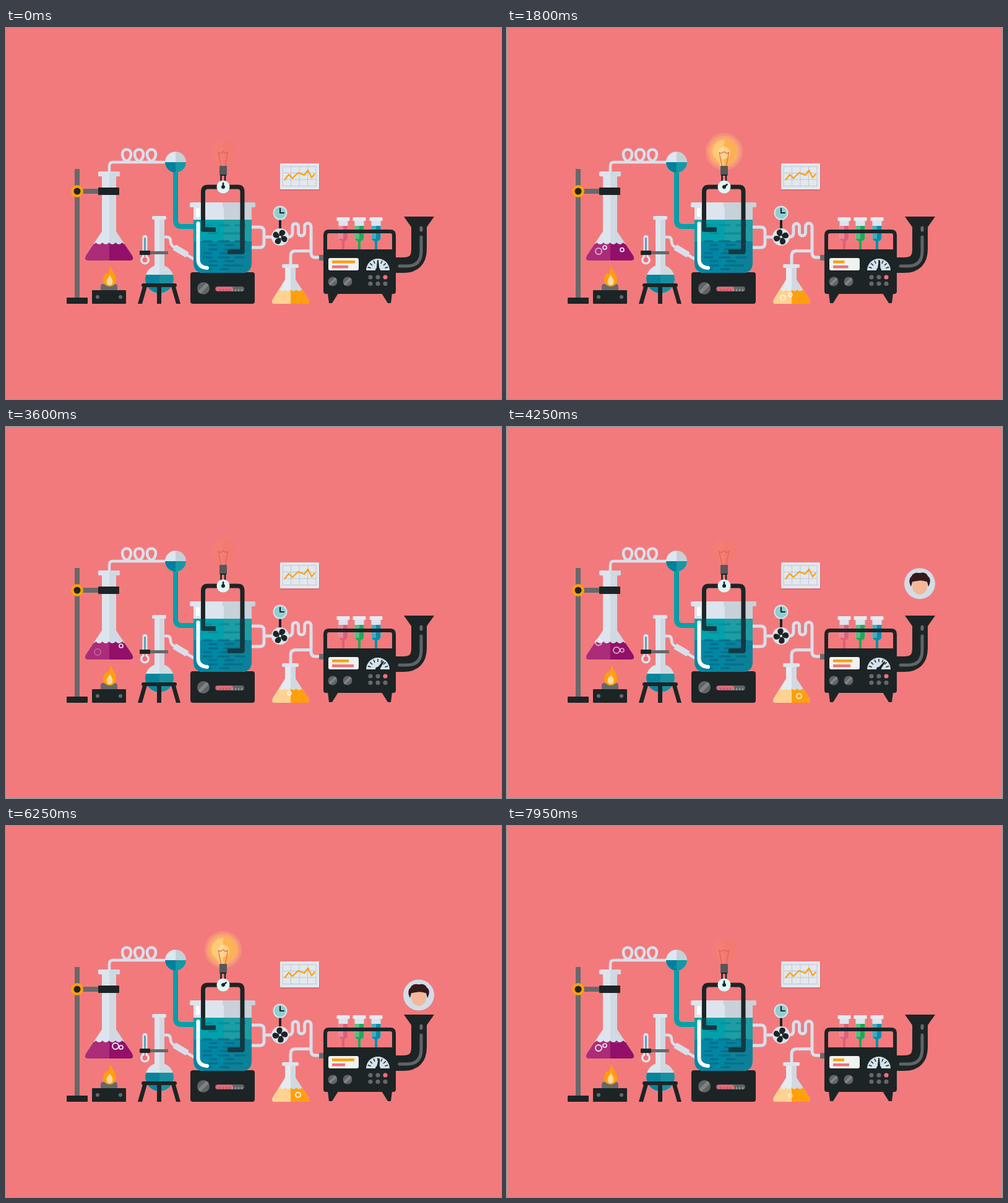
Animation of 800 by 600 pixels, one loop 8 s. Source, as an HTML page with a canvas:

```html
<!DOCTYPE html>
<html lang="en">
<head>
<meta charset="utf-8">
<title>Laboratory</title>
<style>
html, body { margin: 0; width: 100%; height: 100%; overflow: hidden; background: #f27a7c; }
canvas { display: block; width: 800px; height: 600px; }
</style>
</head>
<body>
<canvas id="stage" width="800" height="600"></canvas>
<script>
const c = document.getElementById('stage').getContext('2d');
const LOOP = 8000, STEP = 50, TAU = Math.PI * 2;
const BG = '#f27a7c', DARK = '#1d2426', GREY = '#67686a', GLASS = '#dce4ed', SHADE = '#d0d9e2',
  TUBE = '#d9dfea', ORANGE = '#ff9f0d', TEAL = '#00a1ab', DEEP = '#00809b', PINK = '#f0707a';

const clamp = v => Math.max(0, Math.min(1, v));
const ramp = (t, a, b) => clamp((t - a) / (b - a));

function key(t, list) {
  for (let i = 1; i < list.length; i++) {
    const [t0, v0] = list[i - 1], [t1, v1] = list[i];
    if (t <= t1) return v0 + (v1 - v0) * (t - t0) / (t1 - t0);
  }
  return list[list.length - 1][1];
}

function rect(x, y, x2, y2, color, r = 0) {
  c.fillStyle = color;
  c.beginPath();
  c.roundRect(x, y, x2 - x, y2 - y, r);
  c.fill();
}

function disc(x, y, r, color) {
  c.fillStyle = color;
  c.beginPath();
  c.arc(x, y, r, 0, TAU);
  c.fill();
}

function ring(x, y, r, width, color) {
  c.strokeStyle = color;
  c.lineWidth = width;
  c.beginPath();
  c.arc(x, y, r, 0, TAU);
  c.stroke();
}

function shape(d, color) {
  c.fillStyle = color;
  c.fill(new Path2D(d));
}

function line(d, width, color, cap = 'butt') {
  c.strokeStyle = color;
  c.lineWidth = width;
  c.lineCap = cap;
  c.lineJoin = 'round';
  c.stroke(new Path2D(d));
}

function inside(path, draw) {
  c.save();
  c.clip(typeof path === 'string' ? new Path2D(path) : path);
  draw();
  c.restore();
}

function halves(d, x, left, right) {
  inside(d, () => {
    rect(0, 0, x, 600, left);
    rect(x, 0, 800, 600, right);
  });
}

function ball(x, y, r) {
  const p = new Path2D();
  p.arc(x, y, r, 0, TAU);
  return p;
}

// Liquid with a scalloped surface, to be clipped by its vessel.
function waves(x0, x1, y, n, depth) {
  const w = (x1 - x0) / n;
  let d = `M${x0},${y}`;
  for (let i = 0; i < n; i++) d += `q${w / 2},${depth} ${w},0`;
  return d + `V460H${x0}Z`;
}

function stand() {
  rect(111, 228, 119, 437, GREY);
  rect(98, 436, 132, 446, DARK, 1);
  rect(123, 260, 151, 268, GREY);
  disc(115, 264, 10, ORANGE);
  disc(115, 264, 5.5, DARK);
}

function burner(t) {
  shape('M153,424V418Q153,414 157,414H176Q180,414 180,418V424Z', GREY);
  rect(139, 424, 194, 446, DARK, 1);
  disc(148, 435, 3, GREY);
  disc(185, 435, 3, GREY);
  const s = Math.sin(t / 110) * 1.2, h = Math.sin(t / 75) * 0.8;
  shape(`M${168 + s},${384 + h}C${169 + s},391 178,397 178,407C178,414 173,418 167.5,418C162,418 157,414 157,407C157,402 160,400 161,396C163,397 164,398 164,398C167,394 ${168 + s},389 ${168 + s},${384 + h}Z`, ORANGE);
  shape(`M${168 + s / 2},${399 + h}C169,404 172.5,405 172.5,410C172.5,414 170,416 167.5,416C165,416 162.500,414 162.500,410C162.500,405 ${167 + s / 2},403 ${168 + s / 2},${399 + h}Z`, '#ffd9a0');
}

function bigFlask() {
  line('M167,234V223Q167,217 173,217H260', 4.5, TUBE);
  for (const x of [195, 215, 235])
    line(`M${x - 8},217C${x + 4},217 ${x + 7},209 ${x + 7},204C${x + 7},194 ${x - 7},194 ${x - 7},204C${x - 7},209 ${x - 4},217 ${x + 8},217`, 4.5, TUBE);
  const body = 'M155,238H178V329L204,368Q208,376 200,376H133Q125,376 129,368L155,329Z';
  halves(body, 167, GLASS, SHADE);
  inside(body, () => halves(waves(124, 209, 347, 8, 6), 167, '#ab2c79', '#92106a'));
  rect(149, 232, 184, 240, GLASS, 2);
  rect(167, 232, 184, 240, SHADE, 2);
  rect(149, 258, 183, 270, DARK, 1);
}

function receiver() {
  line('M274,230V311Q274,321 284,321H304', 8, TEAL);
  line('M277,234V310', 2, '#0b95a0');
  const b = ball(274, 217, 17);
  halves(b, 274, '#dce7ef', '#c6cfd6');
  inside(b, () => {
    rect(250, 217, 274, 240, DEEP);
    rect(274, 217, 300, 240, '#1597a6');
  });
}

function roundFlask() {
  line('M255,338H260Q266,338 266,345Q266,352 273,355L304,374', 4.5, TUBE);
  line('M272,354.500L293,367', 10, TUBE, 'butt');
  rect(240, 308, 256, 392, GLASS);
  rect(248, 308, 256, 392, SHADE);
  const b = ball(248, 406, 23);
  halves(b, 248, GLASS, SHADE);
  inside(b, () => {
    rect(220, 399, 248, 432, '#07839c');
    rect(248, 399, 275, 432, '#188fa0');
  });
  rect(236, 304, 259, 310, GLASS, 2);
  rect(219, 413, 276, 419, DARK, 3);
  shape('M221,418H228L220,446H213Z', DARK);
  shape('M267,418H274L282,446H275Z', DARK);
  rect(244, 418, 251, 446, DARK);
  disc(224.5, 375, 7.5, GLASS);
  rect(220.5, 335, 228.5, 374, GLASS, 4);
  rect(223, 339, 226, 362, '#5f9fb8', 1);
  rect(223.5, 362, 225.5, 375, PINK);
  disc(224.5, 375, 4, PINK);
  rect(233, 361, 262, 366, GREY);
  rect(216, 360, 233, 367, DARK, 1);
}

function bulb(power, turn) {
  if (power > 0) {
    c.globalAlpha = power;
    disc(351, 200, 30, '#f58f7b');
    disc(351, 200, 26, '#f7a277');
    disc(351, 200, 22, '#fbb264');
    c.globalAlpha = 1;
  }
  const glass = 'M351,181C362,181 370,189 370,200C370,211 358,214 358,223H344C344,214 332,211 332,200C332,189 340,181 351,181Z';
  halves(glass, 351, '#f47d75', '#f37a70');
  if (power > 0) {
    c.globalAlpha = power;
    halves(glass, 351, '#ffcb76', '#fdb451');
    disc(351, 202, 10, 'rgba(255,232,175,.6)');
    c.globalAlpha = 1;
  }
  line('M347.500,223L343,201L346.500,203L351,200L355,203L358.500,201L354.500,223', 1.2, power > .3 ? '#e95d4d' : '#dd625d');
  rect(345, 223, 357, 238, '#57585a', 1);
  rect(346, 237, 356, 239, DARK);
  line('M347.500,238V250M354,238V250', 2.5, DARK);
  disc(351, 257, 10.5, '#dff7f5');
  c.save();
  c.translate(351, 257);
  c.rotate(turn);
  line('M0,0V-6', 2.5, DARK, 'round');
  disc(0, 0, 3, DARK);
  c.restore();
}

function beaker() {
  const body = 'M303,286H397V380Q397,396 381,396H319Q303,396 303,380Z';
  halves(body, 352, GLASS, '#c8d1d9');
  rect(297, 282, 352, 290, GLASS, 2);
  rect(350, 282, 403, 290, '#c8d1d9', 2);
  inside(body, () => {
    rect(303, 310, 352, 345, TEAL);
    rect(352, 310, 397, 345, '#1e9da4');
    rect(303, 345, 352, 396, '#0087a3');
    rect(352, 345, 397, 396, '#0b8199');
    for (let i = 0; i < 6; i++) {
      const y = 319 + i * 13, o = i % 2 * 9, color = i < 2 ? '#078d99' : '#006f8b';
      line(`M${319 + o},${y}h13M${343 + o},${y}h17M${371 - o / 2},${y}h15`, 3, color, 'round');
      if (i > 1) line(`M${329 - o},${y + 6}h11M${355 - o},${y + 6}h13`, 3, color, 'round');
    }
  });
  const wire = 'M339,326H318.500V265Q318.500,257 326,257H375Q382,257 382,265V362H358';
  line(wire, 7, DARK);
  inside('M303,310H397V396H303Z', () => line(wire, 7, '#123a43'));
  line('M310,294V303', 6, '#fff', 'round');
  line('M310.500,316V374Q310.500,387 325,388', 6, '#fff', 'round');
}

function slanted(x, y, r) {
  disc(x, y, r, '#626365');
  inside(ball(x, y, r), () => line(`M${x - r},${y + r}L${x + r},${y - r}`, r * .55, '#818284'));
}

function hotplate() {
  rect(298, 395, 402, 446, DARK, 4);
  slanted(319, 421, 10);
  rect(338, 418, 385, 426, '#626365', 4);
  rect(339, 418.500, 367, 425.500, '#e46878', 3.5);
  for (let x = 346; x < 384; x += 5) line(`M${x},422V426`, 1.4, x < 366 ? '#b94b60' : '#a5a6a8');
}

function chart() {
  rect(443, 220, 507, 263, '#d96b70', 1);
  rect(443, 219, 506, 261, '#e2e8ee', 1);
  let d = '';
  for (let x = 447; x <= 502; x += 13.5) d += `M${x},224V256`;
  for (let y = 224; y <= 256; y += 10.5) d += `M447,${y}H502`;
  line(d, 1, '#bec6d0');
  line('M450,246L457,237L463,243L472,234L482,238L488,230L494,242L499,236', 2.2, ORANGE);
}

function pipes() {
  line('M397,322H410Q417,322 417,329V348Q417,355 410,355H397M417,338H431', 5, TUBE);
  line('M456,338Q463,338 463,331V321A4.750,4.750 0 0 1 472.500,321V331A5,5 0 0 0 482.500,331V321A5.250,5.250 0 0 1 493,321V364Q493,371 500,371H508', 5, TUBE);
  line('M460,384V369Q460,360.500 468,360.500H493', 5, TUBE);
}

function fan(t) {
  rect(441, 308, 445, 326, DARK);
  disc(443, 299, 11.5, '#d5e7eb');
  disc(443, 299, 9.5, '#8fced1');
  line('M443,292V299H449', 2.2, DARK, 'round');
  disc(443, 338, 14, GLASS);
  c.save();
  c.translate(443, 338);
  c.rotate(t / 1600 * TAU);
  for (let i = 0; i < 4; i++) {
    shape('M0,0C-2,-4 -3,-9 2,-11.500C8,-12 10,-7 7,-4C5,-2 2,-1 0,0Z', DARK);
    c.rotate(TAU / 4);
  }
  c.restore();
  disc(443, 338, 2, GLASS);
}

function smallFlask() {
  const body = 'M451,386H468V407L489,439Q492,446 486,446H434Q428,446 431,439L451,407Z';
  halves(body, 460, '#e5ebef', SHADE);
  inside(body, () => halves(waves(424, 496, 423, 8, 5), 460, '#ffd293', ORANGE));
  rect(446, 382, 473, 388, GLASS, 2);
}

function bubbles(t) {
  const columns = [
    [148, 366, 22, 5, [680, 1600, 2600, 3520, 4510, 5340, 6500, 7660]],
    [158, 366, 22, 3, [400, 1350, 2680, 4300, 5250, 6400, 7500]],
    [177, 366, 22, 5, [720, 1850, 2690, 4050, 5840, 7090]],
    [186, 366, 22, 3, [440, 1500, 3110, 4050, 5920, 6900]],
    [446, 440, 17, 4, [550, 1600, 2650, 4430, 5300, 6700]],
    [458, 440, 17, 2.800, [100, 1350, 3100, 5050, 6400, 7750]],
    [472, 440, 17, 4, [770, 1950, 4000, 5970, 6950]]
  ];
  for (const [x, y, rise, r, births] of columns)
    for (const born of births) {
      const u = (t - born) / 900;
      if (u <= 0 || u >= 1) continue;
      c.globalAlpha = .9 * Math.min(1, u * 3, (1 - u) * 3.5);
      ring(x, y - rise * u, r, r > 3 ? 2 : 1.700, '#fff');
    }
  c.globalAlpha = 1;
}

function tubes() {
  [[545, '#df6078'], [571, '#23a65a'], [598, '#078fa9']].forEach(([x, color]) => {
    shape(`M${x - 7.500},310H${x + 7.500}V339Q${x + 7.500},344 ${x + 2},345V359H${x - 2}V345Q${x - 7.500},344 ${x - 7.500},339Z`, GLASS);
    shape(`M${x - 7.500},320H${x + 7.500}V339Q${x + 7.500},344 ${x + 2},345V359H${x - 2}V345Q${x - 7.500},344 ${x - 7.500},339Z`, color);
    c.globalAlpha = .25;
    rect(x - 7.5, 320, x, 341, '#fff');
    c.globalAlpha = 1;
    rect(x - 10.5, 306, x + 10.5, 312, '#e5ebf0', 1);
  });
}

function machine(t) {
  line('M667.500,316V358Q667.500,383.500 642,383.500H629', 25, DARK);
  shape('M643,305H692L680,322H655Z', DARK);
  line('M671,323V327', 5, GREY, 'round');
  line('M671,338V361Q671,385 648,385H636', 5, '#606466', 'round');
  tubes();
  line('M516,362V335Q516,329 522,329H621Q627,329 627,335V362', 6, DARK);
  rect(506, 367, 514, 376, GREY);
  rect(513, 358, 630, 430, DARK, 4);
  shape('M520,429H537L527,445H522Z', DARK);
  shape('M607,429H624L622,445H617Z', DARK);

  rect(521, 372, 570, 392, '#f1f3f1', 3);
  const wide = key(t, [[0, 37], [1050, 18], [2550, 19], [3600, 27], [5000, 36], [6250, 36], [7950, 18]]);
  const low = key(t, [[0, 26], [1050, 22], [2550, 27], [3600, 35], [5000, 20], [6250, 21], [7950, 26]]);
  rect(527, 376, 527 + wide, 380.5, ORANGE);
  rect(527, 384, 527 + low, 388.5, PINK);

  shape('M582,392A19,19 0 0 1 620,392Z', '#d3e2ec');
  c.save();
  c.translate(601, 392);
  for (let i = -3; i <= 3; i++) {
    c.save();
    c.rotate(i * .42);
    line('M0,-17V-12', 1.500, DARK);
    c.restore();
  }
  const swing = key(t, [[0, 0], [1050, 10], [2550, -3], [3600, 35], [5000, 40], [6250, 8], [7950, 0]]);
  c.rotate(swing * Math.PI / 180);
  shape('M-2.500,0L-1,-16H1L2.500,0Z', DARK);
  c.restore();
  inside('M595,380H607V392H595Z', () => disc(601, 392, 4, DARK));

  slanted(528, 410, 7.5);
  slanted(552, 410, 7.5);
  for (let i = 0; i < 6; i++)
    disc(589 + i % 3 * 12, i < 3 ? 403 : 413.5, 3.6, i === 2 ? PINK : GREY);
}

function pipette(t) {
  const age = t % 2500;
  if (t < 2500 || t >= 7500 || age >= 430) return;
  c.save();
  c.globalAlpha = Math.min(1, age / 40, (430 - age) / 80);
  const drop = ramp(age, 150, 330);
  if (drop > 0 && drop < 1) disc(545, 288 + 20 * drop * drop, 2.5, '#d8426f');
  c.translate(562, 270.5);
  c.rotate(-Math.PI / 4);
  shape('M-11,-4.500H5V4.500H-11L-17,1.500V-1.500Z', '#e8edf0');
  shape('M-11,-4L-22,-1V1L-11,4Z', '#d8486f');
  rect(3, -6, 8, 6, DARK, 1);
  rect(7, -4.5, 22, 4.5, DARK, 4.5);
  line('M11,-1.500H18', 1.500, GREY, 'round');
  c.restore();
}

function portrait(t) {
  for (const start of [3646, 6146]) {
    const u = (t - start) / 800;
    if (u <= 0 || u >= 1) continue;
    const size = Math.min(1, u / .1, (1 - u) / .18);
    c.save();
    c.translate(667, 305 - 280 * u * (1 - u));
    c.scale(size, size);
    disc(0, 0, 25, '#d3dce6');
    shape('M-12,-6H12V6Q11,16 0,18Q-11,16 -12,6Z', '#f3b79a');
    shape('M-14,5C-19,-4 -16,-10 -13,-12C-11,-18 -3,-18 0,-17C7,-19 12,-16 13,-12C18,-9 18,-2 14,5L12,-3Q5,-5 1,-5Q-7,-4 -12,-3Z', '#35191d');
    c.restore();
  }
}

function draw(t) {
  rect(0, 0, 800, 600, BG);
  const phase = t % 5000;
  const power = ramp(phase, 50, 1000) * (1 - ramp(phase, 1780, 2680));
  const turn = .9 * ramp(phase, 50, 450) * (1 - ramp(phase, 1780, 2180));
  stand();
  bigFlask();
  burner(t);
  receiver();
  roundFlask();
  pipes();
  hotplate();
  beaker();
  bulb(power, turn);
  chart();
  fan(t);
  smallFlask();
  bubbles(t);
  portrait(t);
  machine(t);
  pipette(t);
}

const begin = performance.now();
function tick() {
  const t = (performance.now() - begin) % LOOP;
  draw(Math.floor(t / STEP) * STEP);
  requestAnimationFrame(tick);
}
tick();
</script>
</body>
</html>
```
